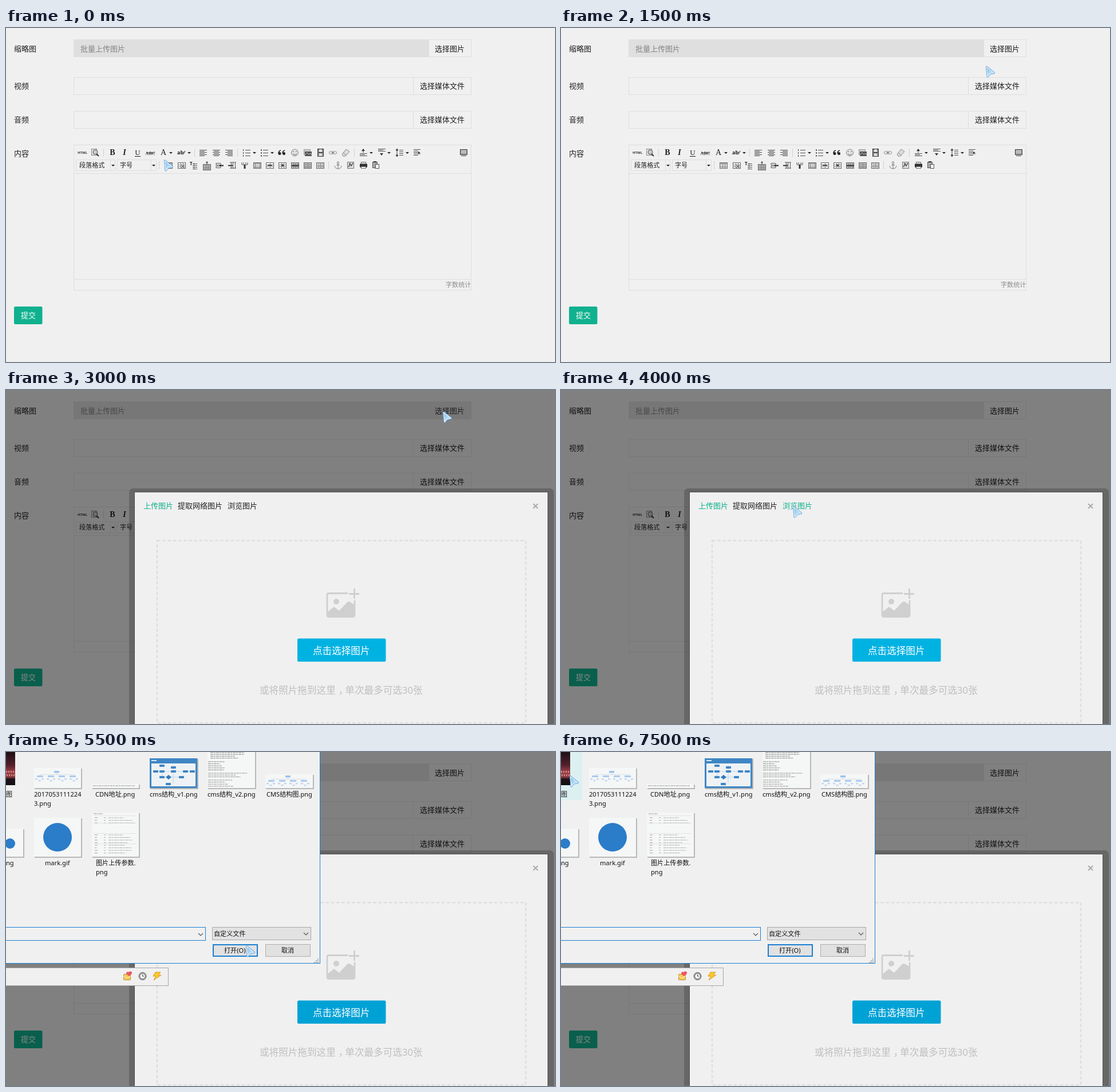
These frames come from a looping animation (959 px wide and 584 px high, 8 s). An HTML page:

```html
<!DOCTYPE html>
<html lang="zh-CN">
<head>
<meta charset="utf-8">
<title>图片上传</title>
<style>
  html, body { margin: 0; width: 100%; height: 100%; overflow: hidden; background: #f0f0f0; }
  svg { display: block; width: 959px; height: 584px; }
  text { font-family: "Noto Sans", "Noto Sans CJK SC", "Noto Sans CJK", sans-serif; white-space: pre; }
  .serif { font-family: "Liberation Serif", serif; }
</style>
</head>
<body>
<svg id="stage" viewBox="0 0 959 584" xmlns="http://www.w3.org/2000/svg"></svg>
<script>
const INK = '#202020', LINE = '#dedede', PAGE = '#f0f0f0', ICON = '#555', BLUE = '#1c7fd2';

const rect = (x, y, w, h, fill, stroke, extra = '') => stroke
  ? `<rect x="${x + .5}" y="${y + .5}" width="${w - 1}" height="${h - 1}" fill="${fill}" stroke="${stroke}" ${extra}/>`
  : `<rect x="${x}" y="${y}" width="${w}" height="${h}" fill="${fill}" ${extra}/>`;
const text = (x, y, s, size = 13, fill = INK, extra = '') =>
  `<text x="${x}" y="${y}" font-size="${size}" fill="${fill}" ${extra}>${s}</text>`;
const path = (d, stroke = ICON, w = 1, fill = 'none', extra = '') =>
  `<path d="${d}" stroke="${stroke}" stroke-width="${w}" fill="${fill}" ${extra}/>`;
const circle = (x, y, r, fill, stroke = 'none') =>
  `<circle cx="${x}" cy="${y}" r="${r}" fill="${fill}" stroke="${stroke}"/>`;
const group = (id, body) => `<g id="${id}">${body}</g>`;
const range = n => [...Array(n).keys()];

// Toolbar pieces
const arrow = (x, y) => path(`M${x - 3} ${y - 1}h6l-3 3z`, 'none', 0, '#222');
const divider = (x, y) => path(`M${x + .5} ${y - 7}v14`, '#d2d2d2');
const rows = (x, y, widths, align = 0, gap = 2, color = ICON) =>
  path(widths.map((w, i) => `M${x + (13 - w) * align} ${y + i * gap + .5}h${w}`).join(''), color);
const letter = (x, s, size, extra = '') => text(x, 222, s, size, INK, `class="serif" text-anchor="middle" ${extra}`);

function grid(x, y, cols, lines, fill = '#f4f4f4') {
  const l = x - 7, t = y - 5;
  const v = range(cols - 1).map(i => `M${l + Math.round((i + 1) * 14 / cols) + .5} ${t}v11`);
  const h = range(lines - 1).map(i => `M${l} ${t + Math.round((i + 1) * 11 / lines) + .5}h14`);
  return rect(l, t, 14, 11, fill, '#666') + path([...v, ...h].join(''), '#888');
}

function toolbar() {
  const y = 218, z = 240;
  const top = [
    text(125, 220, 'HTML', 6, '#333', 'font-weight="600"'),
    rect(149, 211, 10, 12, '#e6e6e6', '#888'), circle(156, 217, 4, '#ccc', '#555'), path('M158 220l4 4', '#333', 2),
    letter(186, 'B', 14, 'font-weight="700"'), letter(207, 'I', 14, 'font-style="italic" font-weight="700"'),
    letter(230, 'U', 13), path('M225 224.5h10', INK),
    letter(252, 'ABC', 8.5), path('M245 218.5h15', INK),
    letter(275, 'A', 14), text(299, 221, 'ab', 9, INK, 'font-weight="700"'), path('M309 221l4-6', '#777', 2),
    rows(338, 213, [13, 9, 13, 9, 13, 9]), rows(361, 213, [13, 9, 13, 9, 13, 9], .5), rows(383, 213, [13, 9, 13, 9, 13, 9], 1),
    path('M414.5 212v3M414.5 217v3M414.5 222v3', '#333'), rows(418, 213, [9, 9, 9], 0, 5),
    path('M445 213.5h2M445 218.5h2M445 223.5h2', '#333', 2), rows(449, 213, [9, 9, 9], 0, 5),
    path('M480 214q-4 1-4 5', '#222', 1.5), circle(478, 219.5, 2.5, '#222'),
    path('M487 214q-4 1-4 5', '#222', 1.5), circle(485.5, 219.5, 2.5, '#222'),
    circle(504.5, 218, 6, '#e4e4e4', '#888'), path('M502 215v2M507 215v2M501 220q3.5 4 7 0', '#555'),
    rect(520, 212, 12, 10, '#ccc', '#999'), rect(522, 216, 12, 8, '#555'), path('M522 222l4-4 3 3 3-2 2 3', '#ccc'),
    rect(544, 211, 11, 14, '#ddd', '#333'), path('M546 212v12M553 212v12', '#444', 2, 'none', 'stroke-dasharray="1 1"'), path('M546 218h7', '#444', 2),
    rect(564, 215, 8, 6, 'none', '#888', 'rx="3"'), rect(570, 215, 8, 6, 'none', '#888', 'rx="3"'), path('M568 218h6', '#666'),
    path('M587 221l7-9 6 4-7 8h-4z', '#888', 1, '#ddd'), path('M589 218l5 4', '#888'),
    rows(618, 219, [13, 9, 13]), path('M624 211l-3 4h6z', ICON, 0, '#333'), path('M624 214v4', '#333'),
    rows(650, 211, [13, 9, 13]), path('M656 223l-3-4h6z', ICON, 0, '#333'),
    path('M683 213v10M681 214l2-3 2 3zM681 222l2 3 2-3z', '#444', 1, '#444'), rows(687, 213, [7, 7, 7, 7], 0, 3),
    rows(712, 212, [12, 8, 8, 12, 8], 0, 2.5), path('M720 216l4 2-4 2z', 'none', 0, '#333'),
    rect(793, 212, 13, 10, '#999', '#444'), path('M795 214.5h9M795 216.5h9M795 218.5h9', '#ddd'), path('M795 223.5h9', '#444'),
    ...[288, 320, 434, 465, 638, 669, 701].map(x => arrow(x, y)),
    ...[170, 329, 404, 608].map(x => divider(x, y))
  ];
  const bottom = [
    rect(122, 230, 69, 20, 'none', LINE), rect(194, 230, 69, 20, 'none', LINE),
    path('M182.5 231v18M253.5 231v18', LINE), text(128, 244, '段落格式', 11.1), text(199, 244, '字号', 11.1),
    arrow(187, z), arrow(258, z),
    grid(284, z, 3, 4), path('M278 236h12', '#777', 2),
    grid(307, z, 3, 3), path('M306 239l6 6M312 239l-6 6', '#555'),
    text(321, 240, 'T', 8, '#222', 'font-weight="700"'), rows(326, 237, [8, 8, 8, 8], 0, 3), path('M328.5 236v10', '#777'),
    grid(351, 243, 3, 2, '#aaa'), path('M351 233v6M349 235h4', '#333'),
    path('M367 236.5h8v3h-8zM367 241.5h8v3h-8z', ICON), path('M373 240.5h7', '#222', 2),
    path('M396.5 235v11M400.5 235v11M393.5 235v11M391 235h11M391 245h11', ICON), path('M388 240.5h8', '#333', 2),
    path('M412 235v4h10v-4M415 235v3M419 235v3', ICON), path('M417 239v7', '#333', 3),
    grid(439, z, 1, 1, '#ccc'), path('M432 236.5h14M432 243.5h14M435.5 235v11M443.5 235v11', '#888'),
    grid(461, z, 2, 3), path('M457 240h8', '#333', 2), grid(483, z, 3, 3), path('M481 240h4', '#333', 3),
    grid(505, z, 4, 3, '#bbb'), path('M499 240.5h13', '#333', 2), grid(527, z, 2, 4, '#bbb'), grid(549, z, 5, 2, '#ddd'),
    circle(580, 235.5, 1.7, 'none', '#777'), path('M580 237v9M577 239.5h6M574 241q1 5 6 5t6-5', '#777'),
    rect(596, 234, 12, 12, '#ddd', '#777'), path('M598 243l3-5 2 3 3-5M599 237h3', '#555', 1.5),
    rect(618, 237, 13, 7, '#333', '#222', 'rx="1"'), rect(620, 234, 9, 4, '#ddd', '#777'), rect(620, 242, 9, 4, '#eee', '#777'),
    rect(640, 234, 9, 11, '#aaa', '#555'), rect(645, 238, 7, 8, '#f4f4f4', '#555'), path('M642 234h5', '#333', 2),
    divider(267, z), divider(563, z)
  ];
  return top.join('') + bottom.join('');
}

function form() {
  const media = (y, name) => text(14, y + 20, name) + rect(118, y, 695, 31, 'none', LINE) +
    path(`M711.5 ${y}v31`, LINE) + text(723, y + 20, '选择媒体文件');
  return text(14, 41, '缩略图') + rect(118, 20, 695, 31, '#dfdfdf') + text(130, 41, '批量上传图片', 13, '#858585') +
    rect(738, 20, 75, 31, PAGE, LINE, 'id="pick"') + text(749, 41, '选择图片', 13, INK, 'id="pickText"') +
    media(86, '视频') + media(145, '音频') + text(14, 224, '内容') +
    rect(118, 204, 695, 255, 'none', LINE) + path('M118 254.5h695M118 439.5h695', LINE) +
    text(768, 452.5, '字数统计', 11.1, '#8c8c8c') + toolbar() +
    rect(14, 487, 49.5, 31, '#10b18e', '', 'rx="2.5"') + text(26, 507, '提交', 13, '#fff');
}

function modal() {
  const grey = '#cfcfcf';
  return rect(215, 172, 742, 430, 'rgba(0,0,0,.2)', '', 'rx="7"') +
    rect(224, 178, 723, 420, PAGE, '#525252') +
    text(240, 207, '上传图片', 13, '#10b08c') + text(300, 207, '提取网络图片') + text(387, 207, '浏览图片', 13, INK, 'id="browse"') +
    path('M921 199l8 8M929 199l-8 8', '#aaa', 2) +
    `<rect x="264" y="263.3" width="644" height="319" fill="none" stroke="#dfdfdf" stroke-width="2.6" stroke-dasharray="5.6 3.6"/>` +
    path('M597 355.5h-33q-3 0-3 3v35q0 3 3 3h42q3 0 3-3v-26', grey, 2.8) +
    path('M608.5 347v18M599 356.5h18', grey, 2.8) + circle(577, 370, 5, grey) +
    path('M562 396v-8l11-9 9 7 14-15q3-2 6 0l7 5v20z', 'none', 0, grey) +
    rect(509, 434.6, 154.5, 40.4, '#00b2e2', '', 'rx="2.5" id="choose"') +
    text(536, 461.5, '点击选择图片', 16.6, '#fff') +
    text(443, 530.5, '或将照片拖到这里<tspan dx="5">，</tspan><tspan dx="-5">单次最多可选30张</tspan>', 16.6, '#bfbfbf');
}

// File chooser
const sheet = (x, y, w, h, fill = '#f5f6f6') =>
  rect(x + 1, y + 1, w + 1, h + 1, '#b8b8b8') + rect(x, y, w, h, fill);
const print = (x, y, w, n, color = '#888', gap = 4.5) => range(n).map(i =>
  path(`M${x} ${y + i * gap}h${w * (.55 + .45 * Math.abs(Math.sin(i * 2.3 + x)))}`, color, .9, 'none', 'stroke-dasharray="5 .8 3 1"')).join('');
const tree = (x, y) => rect(x + 35, y, 9, 3.5, '#9cc3ea') + path(`M${x + 39.5} ${y + 3}v4M${x + 10} ${y + 6.5}h61`, '#c3d0de', .6) +
  range(4).map(i => rect(x + 5 + i * 19, y + 8, 11, 3, '#a9caee') +
    range(3).map(j => rect(x + 2 + i * 20 + j * 5.5, y + 13 + j % 2 * 3, 4, 2.4, '#c0d7f0')).join('')).join('');

function flow() {
  const box = ([x, y]) => rect(x, y, 9, 4, '#3f86c4', '', 'rx="1"');
  const boxes = [[268, 22], [288, 25], [257, 32], [268, 32], [288, 32], [309, 32], [321, 32], [268, 42], [302, 42], [279, 54]];
  return sheet(251, 11, 83, 52, '#3f86c4') + rect(254, 20, 77, 40, '#eef2f5') + rect(254, 14, 9, 2, '#d7e8f7') +
    path('M260 34h66M273 34v10h36M292 23v32', '#a9c6e0', .7) + boxes.map(box).join('') +
    path('M284 40l5 4-5 4-5-4z', 'none', 0, '#3479bd');
}

function chooser() {
  const label = (x, y, s) => text(x, y, s, 11.1, '#111');
  const files = [
    rect(0, 0, 37, 84, '#dcf0f2', '', 'id="hover"'),
    rect(0, 0, 16, 58, 'url(#photo)'), path('M0 34.5h15M1 40.5h14', '#cf8a86', 3, 'none', 'stroke-dasharray="2 2"'),
    label(0, 78, '图'),
    sheet(49, 28, 82, 35), tree(49, 33), label(49, 78, '2017053111224'), label(49, 94, '3.png'),
    sheet(150, 56, 82, 7), print(152, 59, 75, 1), label(156, 78, 'CDN地址.png'),
    flow(), label(251, 78, 'cms结构_v1.png'),
    sheet(352, -4, 83, 67), print(357, 1, 62, 4, '#777', 3.2), print(353, 17, 30, 5, '#777', 3.6),
    print(353, 37, 72, 3, '#888', 3.2), print(353, 49, 44, 4, '#888', 3.6), label(352, 78, 'cms结构_v2.png'),
    sheet(453, 39, 83, 24), tree(453, 41), label(455, 78, 'CMS结构图.png'),
    sheet(-50, 134, 80, 49), circle(7, 160, 9, '#2b7cc9'), label(0, 198, 'ng'),
    sheet(49, 115, 82, 68), circle(90, 149, 25, '#2b7cc9'), label(68, 198, 'mark.gif'),
    sheet(150, 106, 82, 77), print(153, 108, 18, 1), print(155, 115, 6, 3, '#999'), print(171, 115, 4, 3, '#aaa'), print(179, 115, 46, 3, '#aaa'),
    print(155, 145, 6, 8, '#999'), print(171, 145, 4, 8, '#aaa'), print(179, 145, 42, 8, '#aaa'),
    path('M153 111.5h75M153 124.5h75M153 142.5h75M153 160.5h75', '#dcdcdc', .7),
    label(157, 198, '图片上传参数.'), label(157, 214, 'png')
  ];
  const check = (x, y) => path(`M${x} ${y}l4 4 4-4`, '#555', 1.2);
  const ime = rect(-2, 377, 286, 32, PAGE, '#a6a6a6') +
    rect(205, 388, 13, 11, '#f6c95a', '#b98a31', 'rx="1"') + path('M205 392l6 3 7-3', '#fff2c0') +
    path('M210 386q2-3 4-1 3-3 6 0 1 3-5 7-5-3-5-6z', 'none', 0, '#ec5560') +
    circle(238.5, 392, 6.5, '#9a9a9a', '#666') + circle(238.5, 392, 4, '#f2f2f2') + path('M238.5 389v3h2.5', '#444') +
    path('M261 385h9l-4 5h5l-13 9 4-7h-5z', '#c98a1c', .8, '#ffc928');
  const grip = range(3).flatMap(i => range(i + 1).map(j => rect(544 - j * 3, 361 + i * 3, 2, 2, '#aaa'))).join('');
  return ime + rect(-2, -2, 551, 372, PAGE, BLUE) + files.join('') +
    rect(-2, 306, 351, 24, PAGE, BLUE) + check(336, 317) +
    rect(360, 306, 173, 23, '#e2e2e2', '#a8a8a8') + label(363, 322, '自定义文件') + check(520, 316) +
    `<rect x="362" y="337" width="77" height="20" fill="#e1e1e1" stroke="${BLUE}" stroke-width="2"/>` + label(381, 350.5, '打开(O)') +
    rect(453, 336, 79, 22, '#e1e1e1', '#adadad') + label(481, 350.5, '取消') + grip;
}

const defs = `<defs>
  <linearGradient id="photo" x2="0" y2="1"><stop offset="0" stop-color="#1c1016"/><stop offset=".4" stop-color="#54202c"/>
  <stop offset=".6" stop-color="#a04048"/><stop offset=".75" stop-color="#8c3a40"/><stop offset=".82" stop-color="#1c1216"/><stop offset="1" stop-color="#141014"/></linearGradient>
  <linearGradient id="ice" x2="1" y2="1"><stop offset="0" stop-color="#7fb4e6"/><stop offset=".6" stop-color="#b9e0f7"/><stop offset="1" stop-color="#8cc0ea"/></linearGradient>
</defs>`;
const wedge = 'M1.5 1L14.5 11.5 7.5 13 3 18z';
const pointer = path(wedge, '#649fdc', 3, 'none', 'stroke-linejoin="round"') +
  path(wedge, '#e4f3fd', 1.2, 'url(#ice)', 'stroke-linejoin="round"');

document.getElementById('stage').innerHTML = defs + rect(0, 0, 959, 584, PAGE) + form() +
  rect(0, 0, 959, 584, '#000', '', 'id="shade"') +
  `<rect id="focus" x="737" y="20" width="75.5" height="31.5" fill="none" stroke="#6c9ade" stroke-width="1.6"/>` +
  group('modal', modal()) + group('chooser', chooser()) + group('pointer', pointer);

const el = id => document.getElementById(id);
const show = (id, on) => el(id).setAttribute('visibility', on ? 'visible' : 'hidden');
const paint = (id, color) => el(id).setAttribute('fill', color);

const STEP = 500;
const stops = [
  [276, 231], [565, 117], [515, 214], [742, 67], [763, 38], [763, 38], [763, 38], [685, 76],
  [405, 204], [487, 389], [561, 449], [419, 339], [230, 200], [70, 110], [18, 50], [15, 42]
];

function draw(time) {
  const n = Math.floor(time / STEP) % stops.length;
  const fading = n === 5, open = n >= 6;
  el('pointer').setAttribute('transform', `translate(${stops[n]})`);
  el('shade').setAttribute('opacity', open ? .468 : fading ? .067 : 0);
  show('focus', fading);
  show('modal', open);
  show('chooser', n >= 11);
  show('hover', n >= 14);
  paint('pick', fading ? '#d0d0d0' : n === 6 ? '#dfdfdf' : PAGE);
  el('pick').setAttribute('stroke', n === 6 ? '#dfdfdf' : LINE);
  el('pickText').setAttribute('opacity', n >= 4 && n <= 6 ? .85 : 1);
  paint('browse', n === 8 ? '#10b08c' : INK);
  paint('choose', n >= 10 ? '#00a2d5' : '#00b2e2');
}

const start = performance.now();
function tick() {
  draw(performance.now() - start);
  requestAnimationFrame(tick);
}
tick();
</script>
</body>
</html>
```
